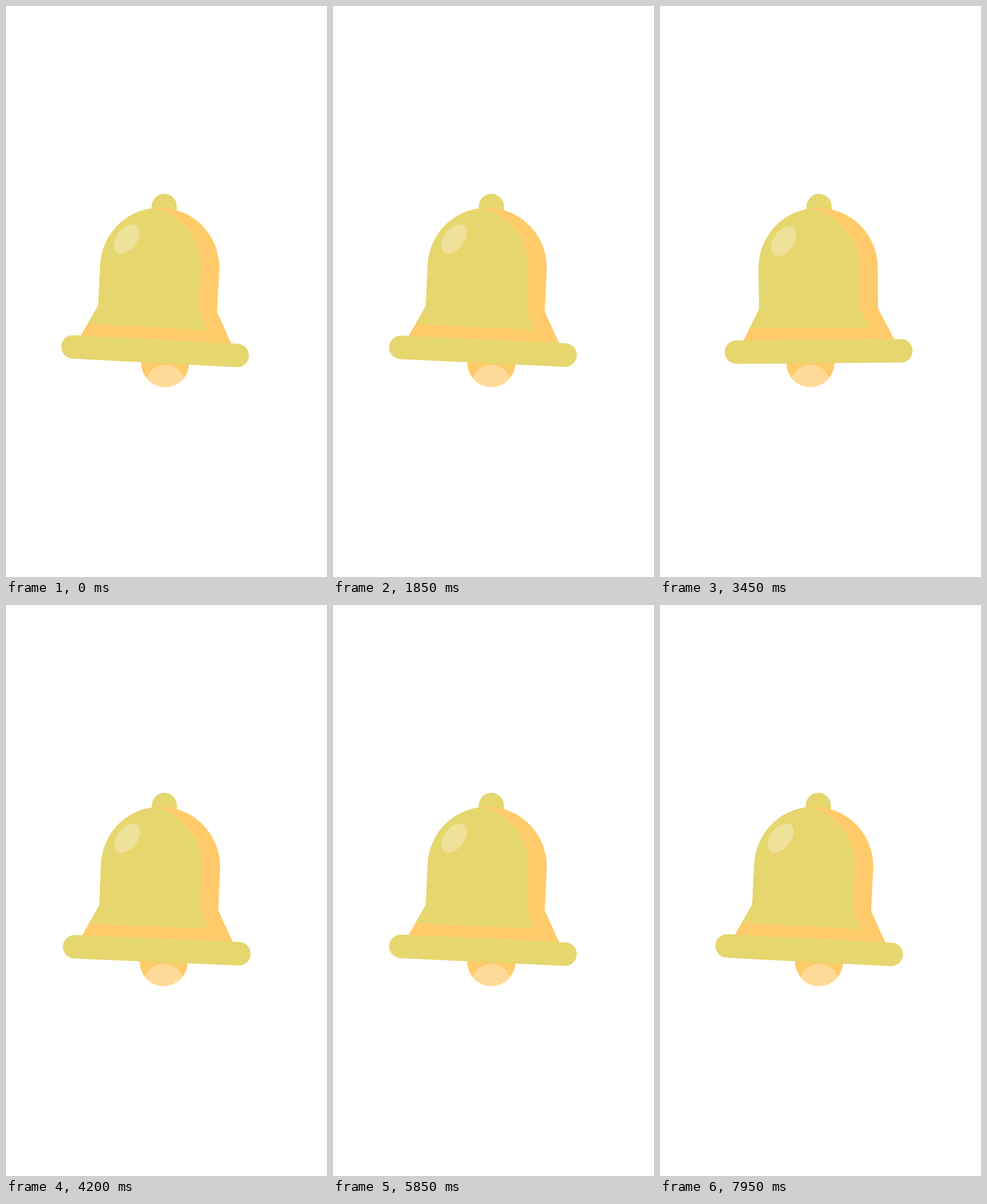
Recreate the animation shown at these times as an HTML page. Size 561 by 998 pixels, loop 8000 ms.

```html
<!DOCTYPE html>
<html lang="en">
<head>
<meta charset="utf-8">
<title>Ringing bell</title>
<style>
  html, body { margin: 0; width: 100%; height: 100%; overflow: hidden; background: #fff; }
  svg { display: block; width: 100%; height: 100%; }
  .gold { fill: #e6d66e; }
  .amber { fill: #ffca69; }
</style>
</head>
<body>
<svg viewBox="0 0 561 998">
  <defs>
    <path id="body" d="M171.5 457a104 104 0 0 1 208 0V529.5L407.5 584H143.5L171.5 529.5Z"/>
    <clipPath id="bodyClip"><use href="#body"/></clipPath>
    <clipPath id="faceClip"><path d="M100 340H450V563L100 561.3Z"/></clipPath>
    <clipPath id="clapperClip"><circle cy="624" r="42"/></clipPath>
  </defs>

  <g id="clapper">
    <circle class="amber" cy="624" r="42"/>
    <circle cy="661.5" r="34.5" fill="#ffda97" clip-path="url(#clapperClip)"/>
  </g>

  <g id="bell">
    <path class="gold" d="M255.8 360V350.3a22 22 0 0 1 44 0V360Z"/>
    <use class="amber" href="#body"/>
    <g clip-path="url(#bodyClip)">
      <g clip-path="url(#faceClip)">
        <use class="gold" href="#body" x="-32"/>
        <rect class="gold" x="140" y="457" width="120" height="110"/>
      </g>
    </g>
    <ellipse cx="215.3" cy="410.5" rx="17.9" ry="29" fill="#eee199" transform="rotate(34.5 215.3 410.5)"/>
    <rect class="gold" x="110.8" y="583.2" width="328.4" height="41.2" rx="20.6"/>
  </g>
</svg>
<script>
  const PERIOD = 2000;
  const bell = document.getElementById('bell');
  const clapper = document.getElementById('clapper');

  function draw(time) {
    const swing = Math.cos(2 * Math.PI * time / PERIOD);
    bell.setAttribute('transform', `rotate(${3 * swing} 278 328)`);
    clapper.setAttribute('transform', `translate(${264.8 + 13.4 * swing} 0)`);
  }

  const start = performance.now();
  function tick() {
    draw(performance.now() - start);
    requestAnimationFrame(tick);
  }
  draw(0);
  requestAnimationFrame(tick);
</script>
</body>
</html>
```
